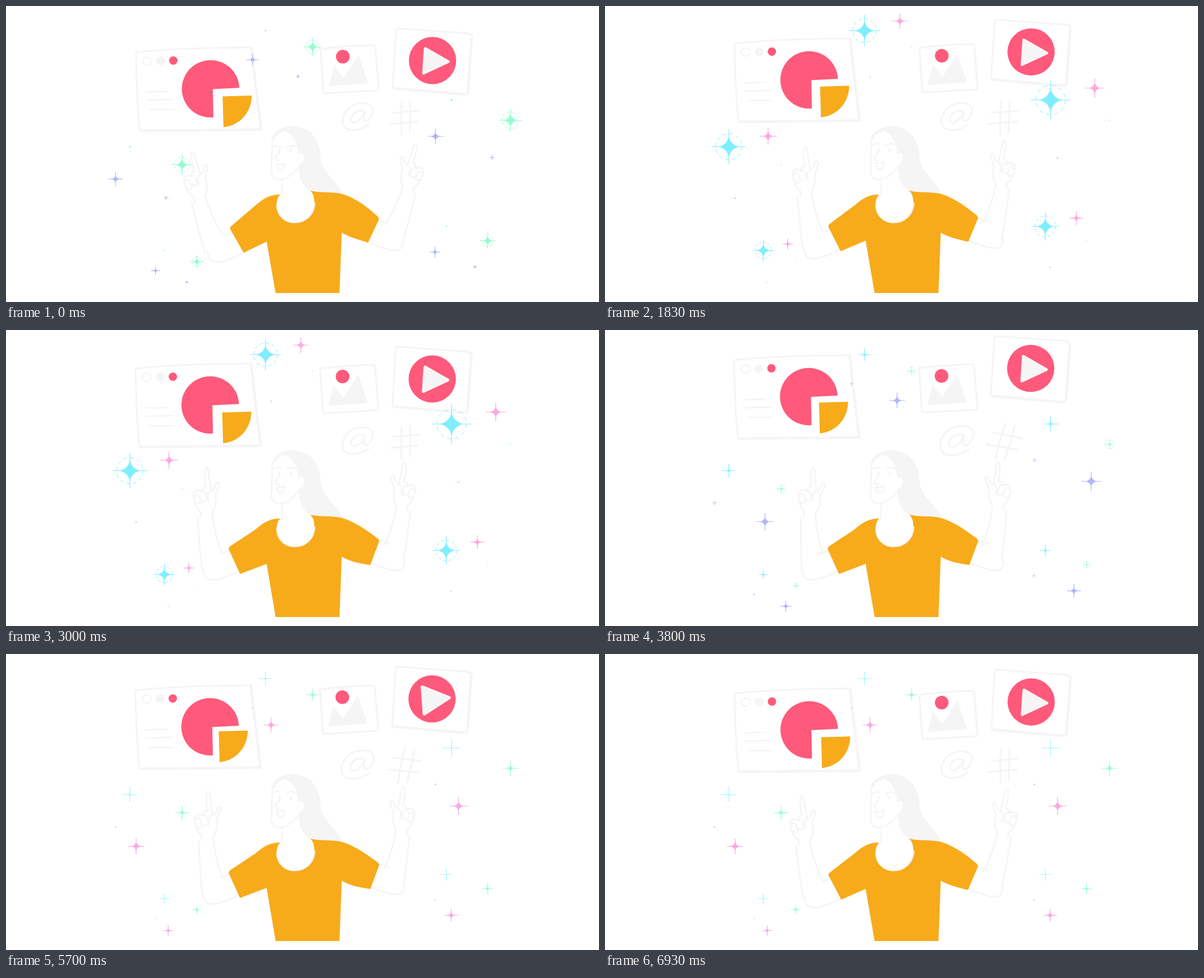
Recreate the animation shown at these times as an HTML page with a canvas. Size 1058 by 529 pixels, loop 7010 ms.

```html
<!DOCTYPE html>
<html lang="en">
<head>
<meta charset="utf-8">
<title>Floating media cards</title>
<style>
  html, body { margin: 0; width: 100%; height: 100%; overflow: hidden; background: #fff; }
  canvas { display: block; width: 100vw; height: 100vh; }
</style>
</head>
<body>
<canvas id="stage" width="1058" height="529"></canvas>
<script>
const ctx = document.getElementById('stage').getContext('2d');
const GREY = '#f6f5f6', PINK = '#ff5a7b', ORANGE = '#f7ab1b', WHITE = '#fff';
const CYAN = '#7feeff', MINT = '#94fdd0', LILAC = '#b4b5fb', ROSE = '#fba9e1';
const LOOP = 7010, CYCLE = 2500, RAD = Math.PI / 180;

// ---------- helpers ----------
const lerp = (a, b, k) => a + (b - a) * k;
const wave = (t, period) => (1 - Math.cos(2 * Math.PI * t / period)) / 2;

// Monotone cubic through [time, value] keys.
function track(keys, t) {
  let i = 0;
  while (i < keys.length - 2 && t > keys[i + 1][0]) i++;
  const slope = j => j < 0 || j > keys.length - 2 ? 0
    : (keys[j + 1][1] - keys[j][1]) / (keys[j + 1][0] - keys[j][0]);
  const tangent = j => {
    const a = slope(j - 1), b = slope(j);
    return a * b <= 0 ? 0 : 2 * a * b / (a + b);
  };
  const [t0, v0] = keys[i], [t1, v1] = keys[i + 1];
  const d = t1 - t0, u = Math.min(1, Math.max(0, (t - t0) / d)), w = 1 - u;
  return v0 * (1 + 2 * u) * w * w + tangent(i) * d * u * w * w
       + v1 * u * u * (3 - 2 * u) - tangent(i + 1) * d * u * u * w;
}

function fill(path, color) { ctx.fillStyle = color; ctx.fill(new Path2D(path)); }

function line(path, width = 3, color = GREY) {
  ctx.strokeStyle = color;
  ctx.lineWidth = width;
  ctx.stroke(new Path2D(path));
}

function disc(x, y, r, color) {
  ctx.fillStyle = color;
  ctx.beginPath();
  ctx.arc(x, y, r, 0, 7);
  ctx.fill();
}

function group(x, y, draw, angle = 0, sx = 1, sy = sx) {
  ctx.save();
  ctx.translate(x, y);
  ctx.rotate(angle * RAD);
  ctx.scale(sx, sy);
  draw();
  ctx.restore();
}

const about = (x, y, angle, scale, draw) =>
  group(x, y, () => { ctx.translate(-x, -y); draw(); }, angle, scale);

// ---------- motion ----------
const WINDOW = [[0, 0], [500, .483], [700, .62], [1300, 1], [1850, .55], [1950, .43], [2500, 0]];
const FOREARM = [[0, 0], [500, .71], [700, .77], [1350, 1], [1850, .62], [1950, .46], [2500, 0]];
const UPPER_ARM = [[0, 0], [450, 1], [1300, 1], [1850, .55], [1950, .38], [2500, 0]];
const SIGNS = [[500, 0], [700, .7], [1050, 1], [1300, 1], [1850, .08], [1950, 0]];
const PLAY = [[500, 0], [780, 1], [1100, 0]];

function pictureLift(t) {
  const u = t / 1667 % 1;
  return u < .5 ? wave(u, 1) : wave(.5 + Math.pow(2 * u - 1, 1.4) / 2, 1);
}

// ---------- cards ----------
function chartWindow(t, lift) {
  group(-1.5 * lift, -29 * lift, () => {
    line('M232 83Q300 75 438 74M232 83Q233 170 239 222', 3);
    line('M438 74Q446 150 455 219Q456 221 452 221L241 223', 4.5);
    line('M260 99A8 7 0 1 1 259.500 96', 2.5);
    disc(276, 98, 8, GREY);
    disc(298.500, 97.500, 7.5, PINK);
    line('M250 153.500L288 152.500M251 168L299 167M256 185L300 185', 2.5);
    ctx.fillStyle = PINK;
    ctx.beginPath();
    ctx.moveTo(369, 148.5);
    ctx.arc(365, 148, 51.3, 84.4 * RAD, 358 * RAD);
    ctx.fill();
    const slide = wave(t, 1000);
    group(-9.2 * slide, -8 * slide, () =>
      fill('M386.500 161.500L438.500 160C438 190 417 214 388 216.500Z', ORANGE));
  });
}

function pictureCard(t) {
  group(-pictureLift(t), -14.3 * pictureLift(t), () => {
    line('M561 77Q600 71 655 70Q659 70 659 74L665 147Q665 150 662 151L570 156Q567 156 566 153Z', 3.5);
    fill('M576 143L585 106L602 129L629 87L646 138Z', GREY);
    disc(601, 90.5, 12.2, PINK);
  });
}

function videoCard(t, phase) {
  const lift = wave(t, CYCLE), pulse = track(PLAY, phase);
  group(-1.5 * lift, -29 * lift, () => {
    line('M826 49L701 40Q697 40 696 44L690 143Q690 146 694 147', 3);
    line('M816 48Q831 49 831 55L824 154Q823 158 819 158L692 147', 4.5);
    disc(761, 97.5, 42.2, PINK);
    about(761, 98, -10 * pulse, 1 + .12 * pulse, () => {
      ctx.lineJoin = 'round';
      fill('M748 76L789 99.500L745 120Z', GREY);
      line('M748 76L789 99.500L745 120Z', 5);
    });
  });
}

function signs(phase) {
  const k = track(SIGNS, phase);
  about(628, 198, 0, 1 + .1 * k, () =>
    line('M639 189C626 183 612 197 616 206C622 212 634 203 640 189C636 204 640 210 648 202' +
         'C662 184 652 172 632 174C608 176 596 200 602 213C608 226 632 223 647 212', 3));
  about(711, 201, 16 * k, 1 + .15 * k, () =>
    line('M706 172Q704 200 706 230M721 172Q722 198 720 226M690 191L736 187M686 211L735 206', 3));
}

// ---------- woman ----------
// Upright forearm and pointing hand, with the elbow at the origin.
function forearm() {
  line('M-13 -18Q-15 -70 -14 -112M12 -116Q13 -80 25 -44', 2.8);
  line('M4 -164Q2 -196 7 -199Q12 -198 11 -184L13 -158', 2.8);
  line('M13 -158Q18 -156 22 -168Q26 -174 29 -168Q24 -156 20 -148Q22 -130 12 -118', 2.8);
  line('M4 -164Q-3 -165 -4 -156Q-10 -163 -17 -157Q-21 -148 -17 -138Q-15 -126 -8 -121L-9 -112', 2.8);
  line('M-17 -150Q-12 -156 -9 -150L-7 -138Q-11 -132 -15 -138M-4 -156Q0 -160 3 -154L4 -142Q-1 -136 -5 -142M13 -158Q4 -152 7 -140', 2.5);
}

function arms(upper, bend) {
  const left = [lerp(372, 364, upper), lerp(456, 445, upper)];
  const right = [lerp(691, 694, upper), lerp(437, 430, upper)];
  group(...left, forearm, -13.9 * (1 - bend));
  group(...left, () => line('M-13 -18C-9 4 -2 2 12 1Q32 -4 54 -16M20 -46L34 -50', 2.8));
  group(...right, forearm, 4.4 + 9.7 * (1 - bend), -.975, .975);
  group(...right, () => line('M18 -18C15 2 8 1 -4 -1Q-24 -5 -46 -15M-10 -48L-26 -54', 2.8));
}

function head(raise) {
  fill('M474 250C471 226 490 214 513 214.500C540 216 560 236 561 268C562 298 588 308 601 336' +
       'C582 332 562 336 543 331C524 318 522 300 523 285L521 262C520 241 510 228 498 224C485 226 477 236 474 250Z', GREY);
  fill('M521 263C536 256 537 282 523 284Z', WHITE);
  line('M475 245Q474 275 474 300C480 316 502 314 523 287M522 263C536 256 537 282 523 284', 2.6);
  line('M493 312L492 338M488 261Q482 268 480 273Q483 277 489 275', 2.3);
  line(`M478 ${253 - 5 * raise}Q484 ${247 - 4 * raise} 491 ${251 - 4 * raise}` +
       `M501 ${253 - 4 * raise}Q510 ${246 - 3 * raise} 519 ${252 - 3 * raise}`, 2.3);
  for (const x of [488, 508]) {
    ctx.fillStyle = GREY;
    ctx.beginPath();
    ctx.ellipse(x, 257, 2, 4, 0, 0, 7);
    ctx.fill();
  }
  group(0, -2.5 * raise, () => line('M483 282Q490 285 498 282Q496 295 488 294Q484 291 483 282Z', 2.5));
}

function shirt(k) {
  const p = (x0, y0, x1, y1) => `${lerp(x0, x1, k)} ${lerp(y0, y1, k)} `;
  fill('M489 337C470 336 457 346 443 358L' + p(401, 394, 399, 387) +
       'L' + p(399.5, 398, 397, 391) + 'L' + p(424, 441, 417.5, 436) +
       'L' + p(465, 421, 465, 418) + 'L481 513L595 513L599 405C612 413 628 417 ' +
       p(646, 423, 650, 420) + 'L' + p(665.5, 381, 666, 377) + 'L' + p(664, 377, 664, 373) +
       'C645 359 625 344 600 336C582 331 562 335 543 330Q550 337 550 350' +
       'C550 398 482 400 483 352Q484 342 489 337Z', ORANGE);
  line('M551 352C549 398 483 399 483 354', 2);
}

// ---------- sparkles ----------
// Each stage: [ray length, core size, ring radius, diagonal length, dashed]
const BIG = [
  [1.5, 1.2, 0, 0, 0], [5, 1.6, 0, 0, 0], [11, 3, 0, 5, 0], [19, 8, 0, 9, 0],
  [24, 11, 0, 6, 0], [27, 14, 16, 0, 0], [28, 17, 21, 0, 0], [17, 0, 15, 0, 1],
  [11, 4, 11, 5, 1], [12, 1.5, 0, 0, 1], [7, 0, 0, 0, 1], [3, 0, 0, 0, 1]
];
const SMALL = [
  [1.3, 1.2, 0, 0, 0], [3.5, 2, 0, 0, 0], [7, 5.5, 0, 0, 0], [14, 8, 0, 0, 0],
  [11, 0, 0, 0, 1], [4, 0, 0, 0, 1]
];
// [dx, dy, color, size, first step, stages]
const SPARKS = [
  [0, 0, CYAN, 1, 0, BIG], [84, 29, MINT, .58, 6, BIG],
  [-23, 52, LILAC, .8, 9, SMALL], [58, 82, LILAC, 1, 11, SMALL],
  [63, -17, ROSE, 1, 3, SMALL], [10, 83, ROSE, .93, 6, SMALL]
];
// [x, y, scale]
const CLUSTERS = [[463, 44, 1], [795, 168, 1.25], [221, 251.5, 1.11], [785.5, 394, .88], [282.5, 437, .69]];

function spark(color, [ray, core, ring, diagonal, dashed], unit) {
  ctx.lineCap = 'butt';
  ctx.setLineDash(dashed ? [3 / unit, 1.5 / unit] : []);
  line(`M0 ${-ray}V${ray}M${-ray} 0H${ray}`, 1.2 / unit, color);
  ctx.setLineDash([]);
  if (core) {
    const c = core, q = core * .17;
    fill(`M0 ${-c}Q${q} ${-q} ${c} 0Q${q} ${q} 0 ${c}Q${-q} ${q} ${-c} 0Q${-q} ${-q} 0 ${-c}Z`, color);
  }
  if (diagonal) {
    const d = diagonal * .7;
    line(`M${-d} ${-d}L${d} ${d}M${d} ${-d}L${-d} ${d}`, .8 / unit, color);
  }
  if (ring) {
    ctx.setLineDash([ring * .28, ring * .243]);
    line(`M${ring} 0A${ring} ${ring} 0 1 1 ${-ring} 0A${ring} ${ring} 0 1 1 ${ring} 0`, 1 / unit, color);
    ctx.setLineDash([]);
  }
}

function sparkles(t) {
  const step = Math.floor(t / 100) % 12;
  for (const [x, y, scale] of CLUSTERS)
    for (const [dx, dy, color, size, start, stages] of SPARKS) {
      const stage = stages[(step - start + 12) % 12];
      const unit = scale * size;
      if (stage) group(x + dx * scale, y + dy * scale, () => spark(color, stage, unit), 0, unit);
    }
}

// ---------- playback ----------
function draw(t) {
  const phase = t % CYCLE;
  const upper = track(UPPER_ARM, phase);
  ctx.fillStyle = WHITE;
  ctx.fillRect(0, 0, 1058, 529);
  ctx.lineCap = ctx.lineJoin = 'round';
  chartWindow(t, track(WINDOW, phase));
  pictureCard(t);
  videoCard(t, phase);
  signs(phase);
  arms(upper, track(FOREARM, phase));
  head(Math.min(1, upper * 1.8));
  shirt(upper);
  sparkles(t);
}

// Twenty pictures a second, held alternately for 30 and 70 ms.
function play() {
  const now = performance.now() % LOOP;
  const picture = Math.min(139, 2 * Math.floor(now / 100) + (now % 100 >= 30 ? 1 : 0));
  draw(picture * 50);
  requestAnimationFrame(play);
}
play();
</script>
</body>
</html>
```
